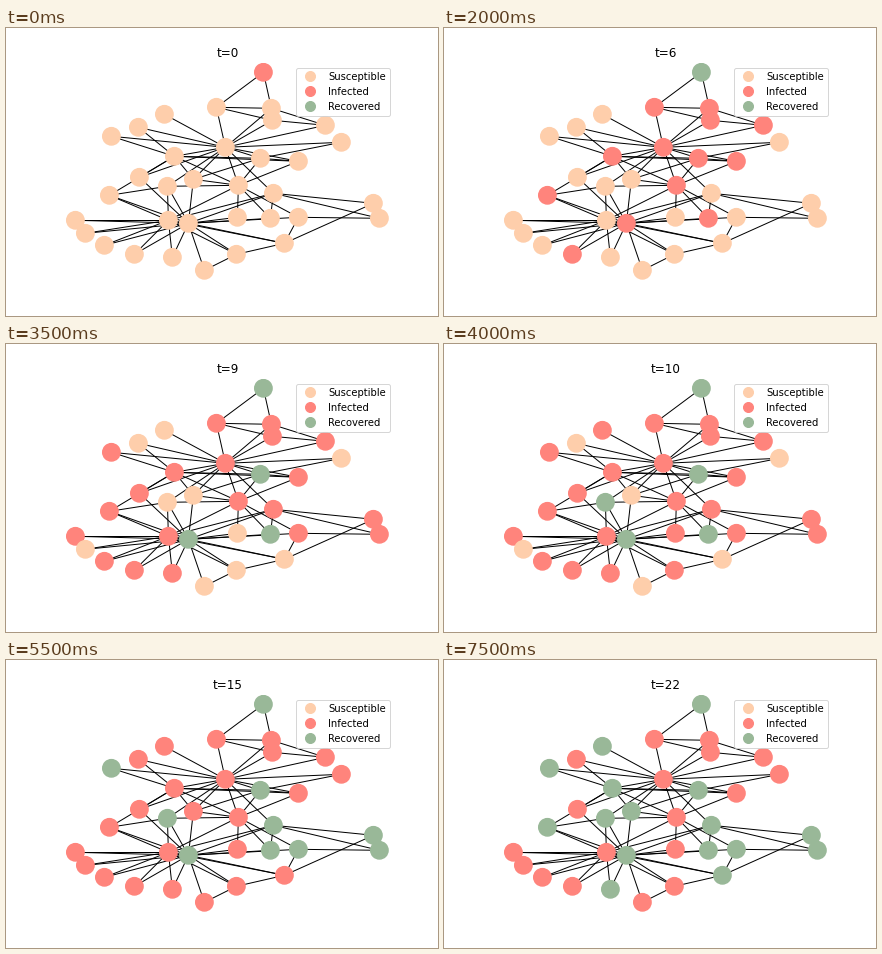
Animation of 432 by 288 pixels, one loop 8 s. Source, as a matplotlib script:

```python
import matplotlib.pyplot as plt
import numpy as np
from matplotlib.animation import FuncAnimation
from matplotlib.collections import LineCollection
from matplotlib.lines import Line2D

DPI = 72
W, H = 432, 288
STEPS = 16
LEGEND = {"Susceptible": "#FECEAB", "Infected": "#FF847C", "Recovered": "#99B898"}
COLORS = np.array(list(LEGEND.values()))

# Node centres in pixels, numbered in the order of infection
POS = np.array([
    (257, 44), (210, 79), (265, 80), (219, 119), (319, 97), (266, 92),
    (254, 130), (168, 128), (232, 157), (292, 133), (103, 167), (182, 195),
    (264, 190), (128, 226), (69, 192), (133, 149), (162, 192), (105, 108),
    (267, 165), (373, 190), (367, 175), (292, 189), (98, 217), (166, 229),
    (230, 226), (231, 189), (158, 86), (161, 158), (79, 205), (198, 242),
    (278, 215), (132, 99), (187, 151), (335, 114),
]) + (0.4, 0.3)

# Hubs reach runs of nodes, the rest are single links
LINKS = {
    3: np.r_[1:3, 4:10, 15, 17:19, 26:28, 31:34],
    11: np.r_[10, 12:17, 18, 21:26, 27:31, 32],
    16: np.r_[8, 10, 13:15, 18, 22:25, 27:29, 30],
    7: np.r_[6, 8:11, 15, 17, 31:33],
    8: [6, 9, 12, 21, 25, 27, 32],
    6: [9, 32, 33],
    18: [12, 19, 20],
    30: [20, 21, 24],
    19: [20, 21],
    0: [1, 2],
    1: [2, 5],
    4: [2, 5],
    10: [27],
    24: [29],
}
RECOVERY = [0, 6, 11, 12, 27, 17, 20, 18, 21, 19, 10, 32, 30, 23, 7, 26]

# Epidemic curves through a few key points
KEYS = [0, 2, 4, 6, 8, 11, 15]
CLOCK = [0, 4, 6, 8, 10, 15, 22]
INFECTED = [1, 7, 14, 19, 28, 34, 34]
RECOVERED = [0, 0, 1, 3, 5, 10, 16]


def curve(step, values):
    return int(np.ceil(np.interp(step, KEYS, values)))


def node_colors(step):
    state = np.zeros(len(POS), dtype=int)
    state[:curve(step, INFECTED)] = 1
    state[RECOVERY[:curve(step, RECOVERED)]] = 2
    return COLORS[state]


fig = plt.figure(figsize=(W / DPI, H / DPI), dpi=DPI, facecolor="white")
fig.subplots_adjust(left=0.125, right=0.9, bottom=0.125, top=0.88)
ax = fig.add_subplot()
# Data units equal pixels, y down
ax.set_xlim(0.125 * W, 0.9 * W)
ax.set_ylim(0.875 * H, 0.12 * H)
ax.axis("off")

edges = [(POS[a], POS[b]) for a, ends in LINKS.items() for b in ends]
ax.add_collection(LineCollection(edges, colors="black", linewidths=1, zorder=1),
                  autolim=False)
nodes = ax.scatter(*POS.T, s=300, c=node_colors(0), linewidths=1.5, zorder=2)
title = ax.set_title("t=0", fontsize=12)

handles = [Line2D([], [], linestyle="none", marker="o", markersize=10,
                  color=color, label=label)
           for label, color in LEGEND.items()]
ax.legend(handles=handles, loc="upper right", fontsize=10)


def update(step):
    nodes.set_color(node_colors(step))
    title.set_text(f"t={curve(step, CLOCK)}")
    return nodes, title


anim = FuncAnimation(fig, update, frames=STEPS, interval=500,
                     repeat=True, repeat_delay=0, blit=False)
plt.show()
```
